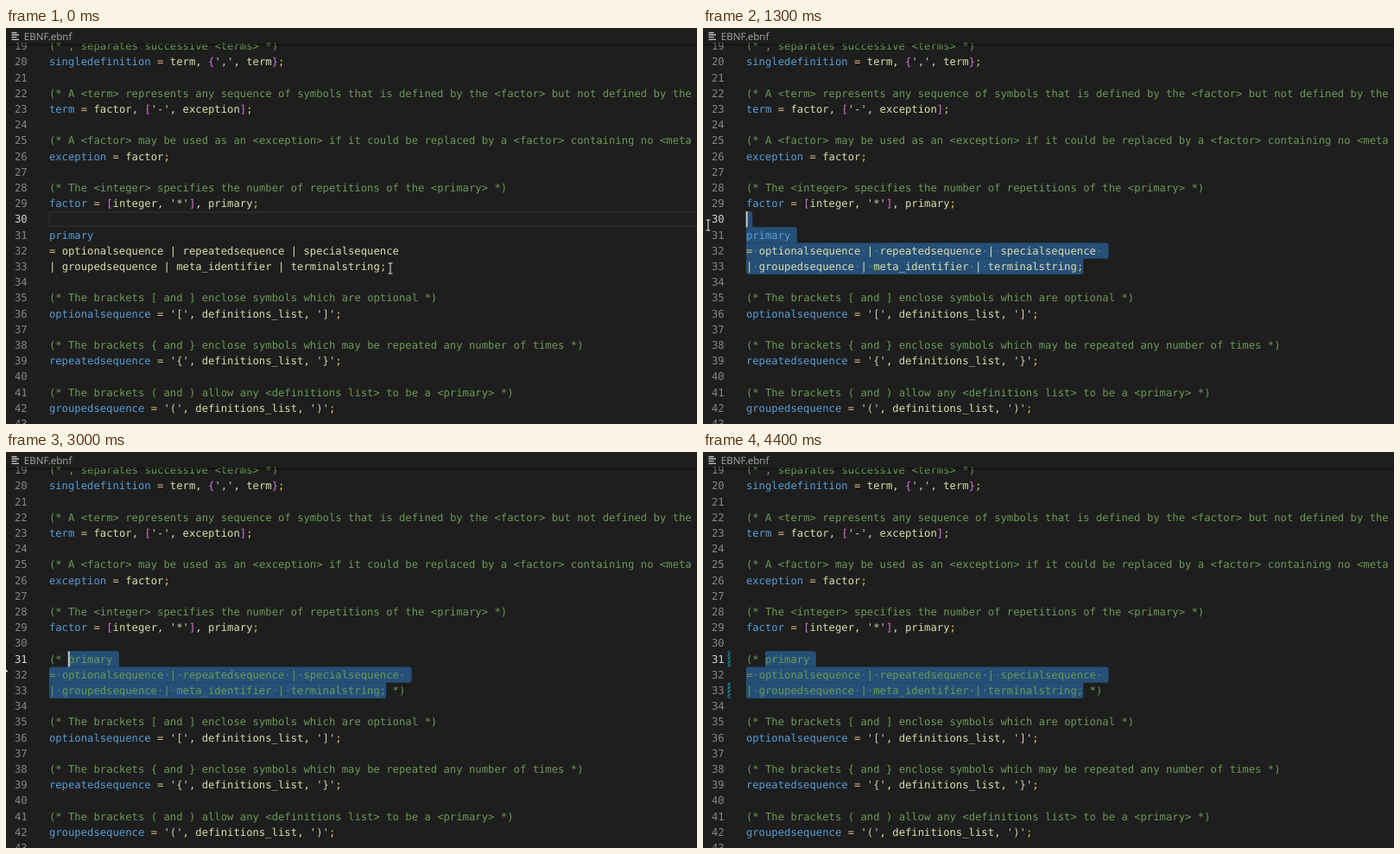
These frames come from a looping animation (800 by 458 pixels, 4500 ms). An HTML page:

```html
<!DOCTYPE html>
<html lang="en">
<head>
<meta charset="utf-8">
<title>Commenting a selection</title>
<style>
  html, body { margin: 0; width: 100%; height: 100%; overflow: hidden; background: #1e1e1e; }
  svg { display: block; }
  text { text-rendering: geometricPrecision; white-space: pre; }
  .code { font: 12.233px "DejaVu Sans Mono", monospace; }
  .title { font: 11.6px "Open Sans", "Noto Sans", sans-serif; fill: #a9a9a9; }
</style>
</head>
<body>
<svg id="stage" width="800" height="458" viewBox="0 0 800 458">
  <defs>
    <clipPath id="editor"><rect y="17" width="800" height="441"/></clipPath>
    <linearGradient id="shade" x1="0" y1="0" x2="0" y2="1">
      <stop offset="0" stop-color="#000" stop-opacity=".45"/>
      <stop offset="1" stop-color="#000" stop-opacity="0"/>
    </linearGradient>
    <pattern id="hatch" width="3" height="3" patternUnits="userSpaceOnUse" patternTransform="rotate(-45)">
      <rect width="3" height="1.9" fill="#1b81a8"/>
    </pattern>
  </defs>
  <rect width="800" height="458" fill="#1e1e1e"/>
  <g clip-path="url(#editor)">
    <g id="back"></g>
    <g id="numbers" class="code"></g>
    <g id="text" class="code"></g>
    <g id="plain" class="code"></g>
    <g id="commented" class="code"></g>
    <g id="marks" fill="url(#hatch)"></g>
    <rect id="caret" width="1.9" height="18.2" fill="#c8cac6"/>
    <rect y="18" width="800" height="4" fill="url(#shade)"/>
  </g>
  <path d="M6.5 5.5h6M6.5 8h8.5M6.5 10.7h6M6.5 13.3h8.5" stroke="#c5c5c5" stroke-width="1.3"/>
  <text class="title" x="20.7" y="14.2">EBNF.ebnf</text>
  <path id="beam" d="M-2.5 -6h2l.5 .5l.5 -.5h2M0 -5.5V5.5M-2.5 6h2l.5 -.5l.5 .5h2" fill="none" stroke="#dcdcdc" stroke-width="1.1"/>
  <path id="arrow" d="M0 0V15.5L3.6 12L6 17.5L8.2 16.5L5.9 11.2H10.8Z" fill="#fff" stroke="#000" stroke-width=".8"/>
</svg>
<script>
const LOOP = 4500, LEFT = 49.9, CHAR = 7.365, LINE = 18.2;
const END = { row: 33, col: 53 };
const FIRST = 19, LAST = 43;

const GREEN = '#6a9955', BLUE = '#569cd6', PALE = '#dcdcaa';
const COLORS = { '=': '#d7ba7d', ';': '#e6c445', '[': '#da70d6', ']': '#da70d6', '{': '#da70d6', '}': '#da70d6' };

const lines = {
  19: '(* , separates successive <terms> *)',
  20: "singledefinition = term, {',', term};",
  22: '(* A <term> represents any sequence of symbols that is defined by the <factor> but not defined by the',
  23: "term = factor, ['-', exception];",
  25: '(* A <factor> may be used as an <exception> if it could be replaced by a <factor> containing no <meta',
  26: 'exception = factor;',
  28: '(* The <integer> specifies the number of repetitions of the <primary> *)',
  29: "factor = [integer, '*'], primary;",
  35: '(* The brackets [ and ] enclose symbols which are optional *)',
  36: "optionalsequence = '[', definitions_list, ']';",
  38: '(* The brackets { and } enclose symbols which may be repeated any number of times *)',
  39: "repeatedsequence = '{', definitions_list, '}';",
  41: '(* The brackets ( and ) allow any <definitions list> to be a <primary> *)',
  42: "groupedsequence = '(', definitions_list, ')';"
};
const block = {
  30: '',
  31: 'primary',
  32: '= optionalsequence | repeatedsequence | specialsequence ',
  33: '| groupedsequence | meta_identifier | terminalstring;'
};
const wrapped = { ...block, 31: '(* ' + block[31], 33: block[33] + ' *)' };

// time, caret row, caret column
const carets = [
  [0, 30, 0], [100, 33, 53], [300, 33, 52], [400, 33, 42], [500, 32, 33],
  [600, 32, 22], [700, 32, 12], [800, 31, 3], [900, 31, 0], [1000, 30, 0],
  [1900, 31, 0], [2700, 31, 3]
];
// time, pointer x, pointer y
const pointer = [
  [0, 445, 278], [200, 445, 278], [300, 430, 274], [400, 350, 266], [500, 250, 258],
  [600, 154, 251], [700, 80, 243], [800, 35, 236], [900, 12, 231], [1000, 6, 228],
  [1700, 6, 228], [1900, 3, 236]
];
const WRAP = 2700, ARROW = 2000, GONE = 3500, DIRTY = 3600;

const $ = id => document.getElementById(id);
const colX = col => LEFT + col * CHAR;
const rowY = row => 212.1 + (row - 30) * LINE;

function add(parent, tag, attrs, content = '') {
  const el = document.createElementNS('http://www.w3.org/2000/svg', tag);
  for (const k in attrs) el.setAttribute(k, attrs[k]);
  el.textContent = content;
  parent.append(el);
  return el;
}

function write(parent, row, col, content, fill) {
  return add(parent, 'text', { x: colX(col), y: rowY(row) + 13.3, fill }, content);
}

function tokenColor(token, col) {
  if (token[0] === "'") return '#d9c9a8';
  if (col === 0 && /\w/.test(token)) return BLUE;
  return COLORS[token] || PALE;
}

function writeLine(parent, row, content, comment) {
  const pattern = comment ? /\S+/g : /'[^']*'|\w+|[^\s\w']/g;
  for (const m of content.matchAll(pattern))
    write(parent, row, m.index, m[0], comment ? GREEN : tokenColor(m[0], m.index));
}

for (const row in lines) writeLine($('text'), +row, lines[row], lines[row].startsWith('(*'));
for (const row in block) {
  writeLine($('plain'), +row, block[row], false);
  writeLine($('commented'), +row, wrapped[row], true);
}
const numbers = {};
for (let row = FIRST; row <= LAST; row++)
  numbers[row] = add($('numbers'), 'text', { x: 9.9, y: rowY(row) + 13.3 }, row);
for (const row of [31, 33])
  add($('marks'), 'rect', { x: 28.6, y: rowY(row), width: 3, height: LINE });

// Rectangle with a radius only on the listed corners: tl, tr, br, bl
function rowPath(x0, x1, y, round) {
  const [a, b, c, d] = round.map(on => on ? 3 : 0), y1 = y + LINE + 0.05;
  return `M${x0 + a} ${y}H${x1 - b}Q${x1} ${y} ${x1} ${y + b}V${y1 - c}Q${x1} ${y1} ${x1 - c} ${y1}` +
    `H${x0 + d}Q${x0} ${y1} ${x0} ${y1 - d}V${y + a}Q${x0} ${y} ${x0 + a} ${y}Z`;
}

function drawSelection(row, col, source) {
  const spans = [];
  for (let r = row; r <= END.row; r++) {
    const from = r === row ? col : 0;
    const to = r === END.row ? END.col : source[r].length + 1;
    spans.push({ r, from, to });
  }
  spans.forEach((s, i) => {
    const up = spans[i - 1], down = spans[i + 1];
    const round = [
      !up || up.from > s.from, !up || up.to < s.to,
      !down || down.to < s.to, !down || down.from > s.from
    ];
    add($('back'), 'path', { d: rowPath(colX(s.from), colX(s.to), rowY(s.r), round), fill: '#264f78' });
    for (let c = s.from; c < Math.min(s.to, source[s.r].length); c++)
      if (source[s.r][c] === ' ')
        add($('back'), 'text', { class: 'code', x: colX(c), y: rowY(s.r) + 13.3, fill: '#e3e4e2', 'fill-opacity': 0.3 }, '·');
  });
}

function drawLineBox(row) {
  add($('back'), 'rect', {
    x: LEFT + 0.5, y: rowY(row) + 0.9, width: 760, height: LINE - 1.8,
    fill: 'none', stroke: '#2a2a2a', 'stroke-width': 1.8
  });
}

const at = (table, t) => table.findLast(step => step[0] <= t);
const show = (id, on) => $(id).setAttribute('visibility', on ? 'visible' : 'hidden');
const move = (id, x, y) => $(id).setAttribute('transform', `translate(${x} ${y})`);

function draw(t) {
  const [since, row, col] = at(carets, t);
  const done = t >= WRAP;
  $('back').replaceChildren();
  if (t < 300) drawLineBox(row);
  else drawSelection(row, col, done ? wrapped : block);

  for (const n in numbers) numbers[n].setAttribute('fill', +n === row ? '#d4d4d4' : '#858585');
  show('plain', !done);
  show('commented', done);
  show('marks', t >= DIRTY);

  move('caret', colX(col) - 0.2, rowY(row));
  show('caret', t >= 100 && (t - since) % 1000 < 500);

  const [, x, y] = at(pointer, t);
  move('beam', x, y);
  move('arrow', -7.3, 243.5);
  show('beam', t < ARROW);
  show('arrow', t >= ARROW && t < GONE);
}

const start = performance.now();
let shown = -1;
function tick() {
  const t = Math.floor((performance.now() - start) % LOOP / 100) * 100;
  if (t !== shown) draw(shown = t);
  requestAnimationFrame(tick);
}
tick();
</script>
</body>
</html>
```
